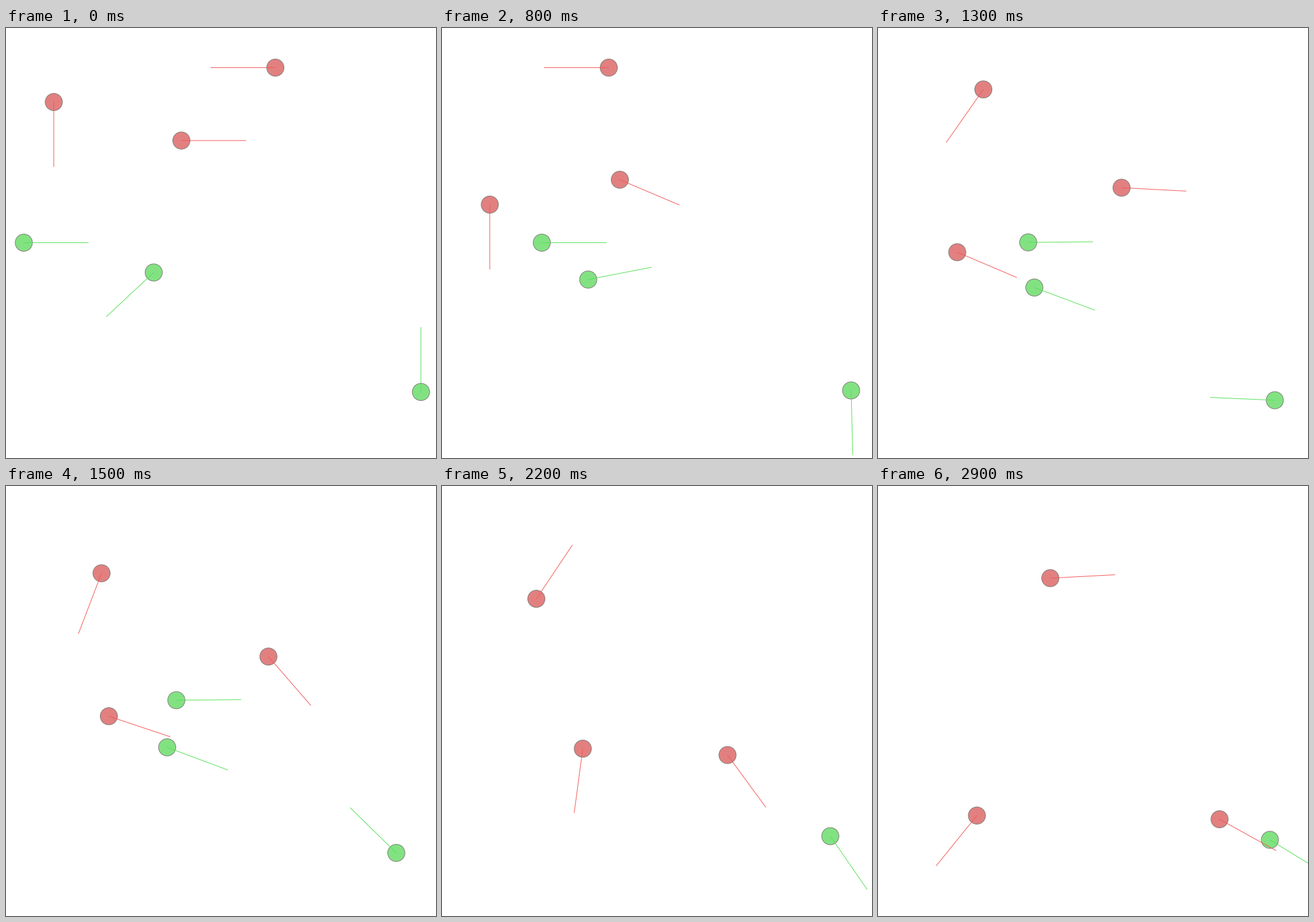
A matplotlib script for the animation above (3 s loop, 700 px wide and 700 px high).

```python
import numpy as np
import matplotlib.pyplot as plt
from matplotlib.animation import FuncAnimation
from matplotlib.patches import Circle

SIZE, DPI = 700, 100
FRAMES, INTERVAL = 30, 100
RADIUS, SIGHT = 14, 105
PX = 72 / DPI  # one pixel in points

BEATS = [0, 4, 8, 13, 18, 25, 29]  # frames at which agents pass their waypoints
CAUGHT = 16  # runners without further waypoints vanish here
START = 0.43  # starting speed as a share of the first leg's mean speed

CHASER = ("#e28080", "#f55858")
RUNNER = ("#82e282", "#58e058")
EDGE = "#807c78"


def unit(deg):
    return np.array([np.cos(np.radians(deg)), np.sin(np.radians(deg))])


def hermite(a, b, va, vb, u):
    return ((2 * u**3 - 3 * u**2 + 1) * a + (3 * u**2 - 2 * u**3) * b
            + (u**3 - 2 * u**2 + u) * va + (u**3 - u**2) * vb)


class Agent:
    """A disc with a heading line, driving through (x, y, degrees) waypoints."""

    def __init__(self, ax, colors, *waypoints):
        points = np.array(waypoints, float)
        self.pos, self.deg = points[:, :2], points[:, 2]
        self.t = np.array(BEATS[:len(points)])
        # each waypoint is left at the mean speed of the next leg
        legs = np.hypot(*np.diff(self.pos, axis=0).T) / np.diff(self.t)
        speed = np.append(legs, legs[-1])
        speed[0] *= START
        self.vel = speed[:, None] * unit(self.deg).T
        self.end = FRAMES if len(points) == len(BEATS) else CAUGHT

        fill, line = colors
        self.disc = ax.add_patch(Circle((0, 0), RADIUS, fc=fill, ec=EDGE, lw=PX, zorder=1))
        self.ray, = ax.plot([], [], color=line, lw=PX, snap=False, zorder=2)

    def pose(self, k):
        if k >= self.t[-1]:
            return self.pos[-1] + self.vel[-1] * (k - self.t[-1]), self.deg[-1]
        i = np.searchsorted(self.t, k, side="right") - 1
        h = self.t[i + 1] - self.t[i]
        u = (k - self.t[i]) / h
        pos = hermite(*self.pos[i:i + 2], *(self.vel[i:i + 2] * h), u)
        turn = self.deg[i + 1] - self.deg[i]
        return pos, self.deg[i] + turn * (1 - (1 - u)**2)

    def draw(self, k):
        pos, deg = self.pose(k)
        self.disc.center = pos
        self.ray.set_data(*np.array([pos, pos + SIGHT * unit(deg)]).T)
        for part in (self.disc, self.ray):
            part.set_visible(k < self.end)
        return self.disc, self.ray


fig = plt.figure(figsize=(SIZE / DPI, SIZE / DPI), dpi=DPI, facecolor="white")
ax = fig.add_axes([0, 0, 1, 1])
ax.set_xlim(-0.5, SIZE - 0.5)
ax.set_ylim(SIZE - 0.5, -0.5)
ax.axis("off")

agents = [
    Agent(ax, CHASER, (438, 64, 180), (369, 64, 180), (271, 64, 180), (171, 99.5, 125),
          (146.5, 197, 103), (194, 157, 349), (280, 149.5, 357)),
    Agent(ax, CHASER, (77.3, 120, 90), (77.3, 189, 90), (77.3, 287, 90), (128.5, 364.5, 23),
          (220.5, 382.5, 16), (205, 478, 116), (160.5, 536, 129)),
    Agent(ax, CHASER, (285, 182.7, 0), (271, 209, 133), (289, 246.5, 23), (396, 259.5, 3),
          (452, 338.5, 75), (486.5, 499, 49), (555.5, 542, 29)),
    Agent(ax, RUNNER, (28.5, 349, 0), (92, 349, 0), (162, 349, 0), (244, 348.5, -0.5)),
    Agent(ax, RUNNER, (240, 397.5, 137), (231, 406.5, 178), (237.5, 409, -11),
          (254, 422, 20.5)),
    Agent(ax, RUNNER, (675, 592, -90), (662.5, 575, -100.5), (665.5, 589.5, 88.5),
          (645.5, 605.5, 182.5), (627.5, 579, 248), (635, 568.5, 453), (637.5, 575.5, 391.5)),
]


def update(k):
    return [part for agent in agents for part in agent.draw(k)]


anim = FuncAnimation(fig, update, frames=FRAMES, interval=INTERVAL, repeat=True, repeat_delay=0)
plt.show()
```
